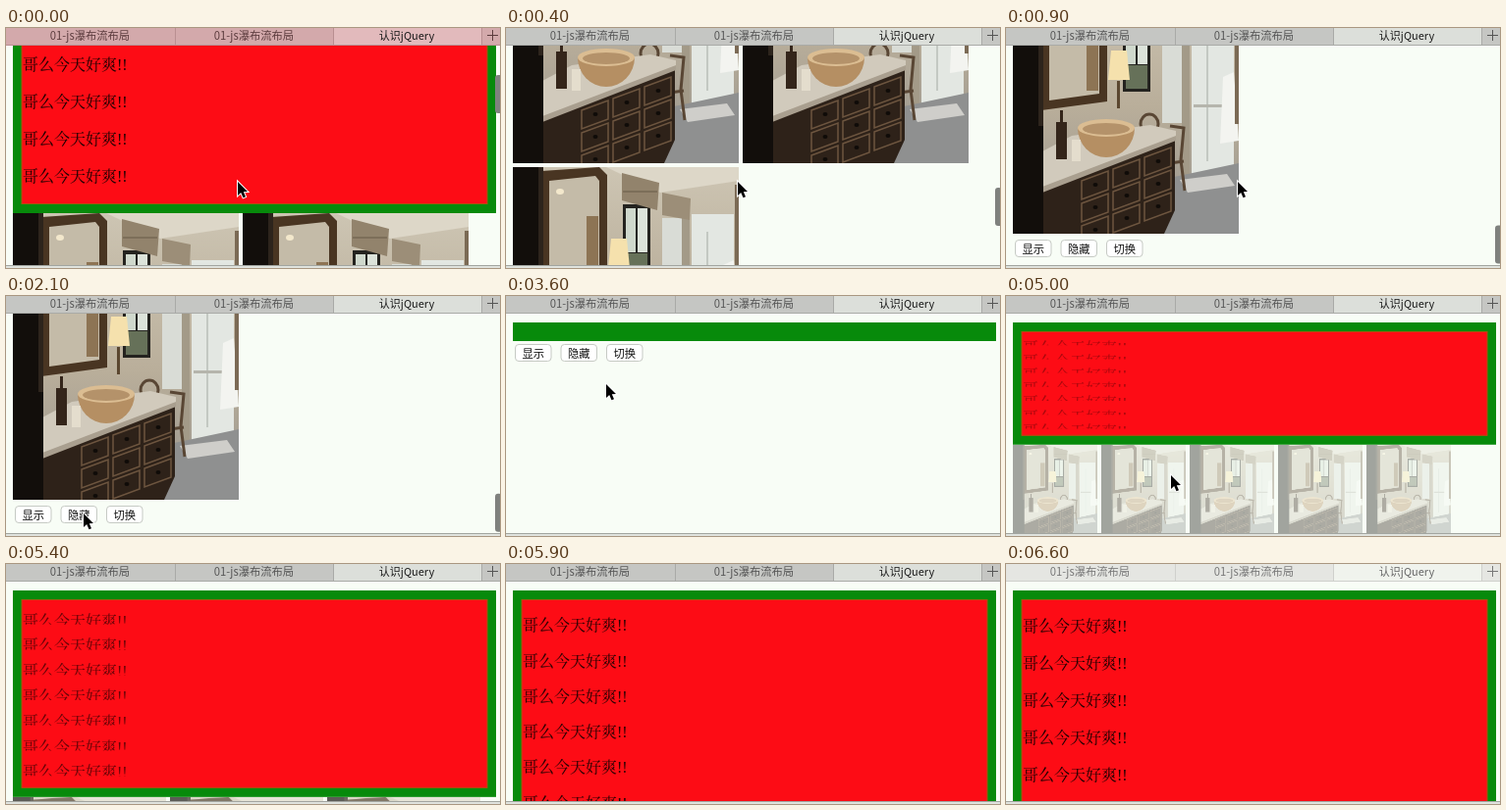
Recreate the animation shown at these times as an HTML page with a canvas. Size 503 by 245 pixels, loop 6700 ms.

```html
<!DOCTYPE html>
<html lang="zh-CN">
<head>
<meta charset="utf-8">
<style>
html, body { margin: 0; width: 100%; height: 100%; overflow: hidden; background: #f8fdf6; }
canvas { display: block; }
</style>
</head>
<body>
<canvas id="stage" width="503" height="245"></canvas>
<script>
const W = 503, H = 245, LOOP = 6700, STEP = 100;
const TOP = 18, BOTTOM = 243;
const PAGE = '#f8fdf6';
const SANS = '"Noto Sans CJK SC", "Noto Sans CJK", sans-serif';
const SERIF = '"Liberation Serif", "Noto Serif CJK SC", "Noto Sans CJK SC", serif';
const IMG_W = 230, IMG_H = 260, GAP = 4, IMAGES = 5;
const LINE = 21, MARGIN = 17, LINES = 7;
const HIDE = { start: 2760, length: 430 };
const SHOW = { start: 4150, length: 2030 };
const ctx = document.getElementById('stage').getContext('2d');

const clamp = (v, lo, hi) => Math.min(hi, Math.max(lo, v));
const swing = u => 0.5 - Math.cos(Math.PI * clamp(u, 0, 1)) / 2;
const progress = (t, a) => swing((t - a.start) / a.length);

function rect(c, color, x, y, w, h) {
  c.fillStyle = color;
  c.fillRect(x, y, w, h);
}

function poly(c, color, ...pts) {
  c.fillStyle = color;
  c.beginPath();
  for (let i = 0; i < pts.length; i += 2) c.lineTo(pts[i], pts[i + 1]);
  c.fill();
}

function oval(c, color, x, y, rx, ry, from = 0, to = Math.PI * 2) {
  c.fillStyle = color;
  c.beginPath();
  c.ellipse(x, y, rx, ry, 0, from, to);
  c.fill();
}

function label(text, x, y, font, color, align = 'center') {
  ctx.font = font;
  ctx.fillStyle = color;
  ctx.textAlign = align;
  ctx.textBaseline = 'middle';
  ctx.fillText(text, x, y);
}

// Bathroom picture, painted once
function paintRoom() {
  const cv = document.createElement('canvas');
  cv.width = IMG_W;
  cv.height = IMG_H;
  const c = cv.getContext('2d');
  const wall = c.createLinearGradient(0, 0, 0, IMG_H);
  wall.addColorStop(0, '#cdc5b3');
  wall.addColorStop(0.5, '#b9ae9a');
  wall.addColorStop(1, '#97948e');
  rect(c, wall, 0, 0, IMG_W, IMG_H);
  poly(c, '#ddd7c8', 95, 0, 230, 0, 230, 14, 150, 26);
  // shower and doorway
  rect(c, '#d9dcd6', 152, 52, 26, 95);
  rect(c, '#a39a88', 172, 40, 8, 165);
  rect(c, '#e3e7e2', 182, 48, 43, 155);
  rect(c, '#c3c8c2', 197, 66, 2, 120);
  rect(c, '#b5b5ac', 184, 128, 30, 3);
  poly(c, '#f3f4f0', 214, 100, 225, 95, 230, 165, 211, 168);
  rect(c, '#7b6a55', 226, 18, 4, 130);
  // windows and blinds
  rect(c, '#24231f', 112, 38, 28, 77);
  rect(c, '#cfd8cc', 115, 42, 10, 45);
  rect(c, '#dce3da', 127, 42, 10, 45);
  rect(c, '#667159', 115, 88, 22, 24);
  poly(c, '#92836c', 111, 6, 149, 16, 147, 44, 111, 34);
  poly(c, '#9c8e78', 152, 26, 181, 32, 180, 54, 152, 49);
  rect(c, '#7c6e59', 112, 24, 35, 2);
  // floor, rug and stool
  poly(c, '#8f9090', 150, 205, 230, 188, 230, 260, 140, 260);
  poly(c, '#cfceca', 170, 205, 218, 199, 226, 211, 178, 218);
  c.strokeStyle = '#594634';
  c.lineWidth = 3;
  c.beginPath();
  c.ellipse(139, 148, 9, 10, 0, 0, 7);
  c.moveTo(160, 150); c.lineTo(174, 152); c.lineTo(171, 185); c.lineTo(175, 216);
  c.moveTo(160, 188); c.lineTo(174, 186);
  c.stroke();
  // mirror
  poly(c, '#493522', 29, 4, 88, 0, 96, 8, 96, 125, 29, 134);
  poly(c, '#c4bba8', 37, 14, 84, 9, 88, 14, 88, 117, 37, 124);
  rect(c, '#8d7454', 75, 50, 12, 64);
  oval(c, '#f3e8cc', 48, 25, 4, 3);
  // lamp
  rect(c, '#5b4730', 106, 104, 3, 28);
  poly(c, '#f5e1ad', 100, 73, 116, 73, 119, 103, 97, 103);
  // vanity
  poly(c, '#2e2219', 30, 216, 165, 164, 165, 236, 154, 260, 30, 260);
  c.strokeStyle = '#6d553f';
  c.lineWidth = 1.5;
  for (let col = 0; col < 3; col++) {
    for (let row = 0; row < 3; row++) {
      const x = 70 + col * 32, y = 206 - col * 12 + row * 23;
      c.beginPath();
      c.moveTo(x, y); c.lineTo(x + 27, y - 10);
      c.lineTo(x + 27, y + 9); c.lineTo(x, y + 19);
      c.closePath();
      c.stroke();
      oval(c, '#0f0b08', x + 14, y + 4, 2.5, 2);
    }
  }
  poly(c, '#d1cabc', 30, 176, 60, 160, 140, 149, 166, 155, 166, 164, 30, 217);
  poly(c, '#a99f8f', 30, 212, 166, 160, 166, 165, 30, 218);
  // basin and bottles
  oval(c, '#b58f63', 95, 152, 29, 30, 0, Math.PI);
  oval(c, '#dbbd92', 95, 152, 29, 9);
  oval(c, '#b4926a', 95, 153, 24, 6);
  rect(c, '#34251a', 44, 146, 11, 38);
  rect(c, '#34251a', 48, 134, 3, 14);
  rect(c, '#e4ddcd', 60, 164, 9, 22);
  // dark door
  rect(c, '#120e0b', 0, 0, 31, IMG_H);
  rect(c, '#2d241c', 26, 0, 5, 150);
  return cv;
}
const room = paintRoom();

// Visible share of paragraphs and pictures
function shareAt(t) {
  if (t < SHOW.start) return 1 - progress(t, HIDE);
  return progress(t, SHOW);
}

function layout(p) {
  const inner = p * (LINES * (LINE + MARGIN) + MARGIN);
  const boxEnd = 27 + inner + 19;
  const w = IMG_W * p, h = IMG_H * p;
  const perRow = clamp(Math.floor(496 / (w + GAP)), 1, IMAGES);
  const rows = Math.ceil(IMAGES / perRow);
  const rowH = Math.max(h, 14) + GAP;
  const end = p > 0 ? boxEnd + rows * rowH - GAP : boxEnd;
  return { inner, boxEnd, w, h, perRow, rowH, end, buttons: p > 0 ? end + 6 : boxEnd + 3 };
}

function scrollAt(t, lay) {
  if (t >= SHOW.start) return 0;
  const limit = Math.max(0, lay.end + 35 - BOTTOM);
  const wanted = 140 + 769 * (1 - Math.pow(1 - clamp(t / 1000, 0, 1), 2.7));
  return Math.min(wanted, limit);
}

// time, x, y
const PATH = [
  [1300, 236, 157], [2050, 79, 222], [3320, 79, 222], [3600, 102, 90],
  [3950, 120, 57], [4300, 120, 57], [4700, 140, 118], [5000, 168, 183], [5350, 200, 262]
];

function cursorAt(t) {
  const i = PATH.findIndex(k => k[0] > t);
  if (i === 0) return PATH[0].slice(1);
  if (i < 0) return PATH[PATH.length - 1].slice(1);
  const [t0, x0, y0] = PATH[i - 1], [t1, x1, y1] = PATH[i];
  const u = (t - t0) / (t1 - t0);
  return [x0 + (x1 - x0) * u, y0 + (y1 - y0) * u];
}

function drawBox(lay, p) {
  rect(ctx, '#078a0b', 7, 27, 492, lay.boxEnd - 27);
  if (lay.inner < 1) return;
  rect(ctx, '#fd0c15', 16, 36, 474, lay.inner + 1);
  ctx.strokeStyle = '#a5560f';
  ctx.lineWidth = 1;
  ctx.strokeRect(16, 36.5, 474, lay.inner);
  for (let i = 0; i < LINES; i++) {
    const y = 36 + p * (MARGIN + i * (LINE + MARGIN));
    ctx.save();
    ctx.globalAlpha = p;
    if (p < 1) {
      ctx.beginPath();
      ctx.rect(16, y, 474 * p, LINE * p);
      ctx.clip();
    }
    label('哥么今天好爽!!', 17, y + 12, '16px ' + SERIF, '#1c0202', 'left');
    ctx.restore();
  }
}

function drawImages(lay, p) {
  if (p <= 0) return;
  ctx.globalAlpha = p;
  for (let i = 0; i < IMAGES; i++) {
    const x = 7 + (i % lay.perRow) * (lay.w + GAP);
    const y = lay.boxEnd + Math.floor(i / lay.perRow) * lay.rowH + lay.rowH - GAP - lay.h;
    ctx.drawImage(room, x, y, lay.w, lay.h);
  }
  ctx.globalAlpha = 1;
}

function drawButtons(y) {
  ['显示', '隐藏', '切换'].forEach((text, i) => {
    const x = 9.5 + i * 46.5;
    ctx.beginPath();
    ctx.roundRect(x, y + 0.5, 36.5, 17, 3.5);
    ctx.fillStyle = '#fff';
    ctx.fill();
    ctx.strokeStyle = '#c6cac4';
    ctx.lineWidth = 1;
    ctx.stroke();
    label(text, x + 18.2, y + 9.3, '11.3px ' + SANS, '#111');
  });
}

function drawTabs(red, idle) {
  const [back, front, edge] = idle ? ['#e5e6e2', '#f0f3ed', '#cfd0cc']
    : red ? ['#d3a9ab', '#e2babc', '#b98f91'] : ['#c5c6c3', '#dcdfda', '#a9aaa7'];
  rect(ctx, back, 0, 0, W, TOP);
  rect(ctx, front, 333, 0, 151, TOP);
  rect(ctx, edge, 0, TOP - 1, W, 1);
  for (const x of [172, 333, 484]) rect(ctx, edge, x, 0, 1, TOP);
  const dim = idle ? '#777' : red ? '#5c3c3e' : '#555';
  label('01-js瀑布流布局', 85.5, 7.5, '11.3px ' + SANS, dim);
  label('01-js瀑布流布局', 252.5, 7.5, '11.3px ' + SANS, dim);
  label('认识jQuery', 408, 7.5, (idle ? '' : '500 ') + '11px ' + SANS, idle ? '#666' : '#1a1a1a');
  rect(ctx, dim, 490, 7, 11, 1);
  rect(ctx, dim, 495, 2, 1, 11);
}

function drawThumb(t, scroll) {
  const alpha = 1 - clamp((t - 2150) / 300, 0, 1);
  if (!alpha) return;
  ctx.globalAlpha = alpha;
  ctx.beginPath();
  ctx.roundRect(498, 20 + scroll * 0.2, 7, 39, 3);
  ctx.fillStyle = '#7f817e';
  ctx.fill();
  ctx.globalAlpha = 1;
}

function drawCursor(x, y) {
  ctx.save();
  ctx.translate(x, y);
  ctx.beginPath();
  for (const [px, py] of [[0, 0], [0, 14], [3.2, 11], [5.5, 16.3], [8, 15.2], [5.8, 10.2], [10, 10]])
    ctx.lineTo(px, py);
  ctx.closePath();
  ctx.strokeStyle = '#fff';
  ctx.lineWidth = 2;
  ctx.stroke();
  ctx.fillStyle = '#000';
  ctx.fill();
  ctx.restore();
}

function draw(t) {
  const p = shareAt(t), lay = layout(p), scroll = scrollAt(t, lay);
  rect(ctx, PAGE, 0, 0, W, H);
  ctx.save();
  ctx.translate(0, -Math.round(scroll));
  drawBox(lay, p);
  drawImages(lay, p);
  drawButtons(Math.round(lay.buttons));
  ctx.restore();
  drawThumb(t, scroll);
  rect(ctx, '#dfe2dd', 0, BOTTOM, W, 2);
  rect(ctx, '#a2a5a0', 0, BOTTOM - 1, W, 1);
  drawTabs(scroll > 20 && lay.boxEnd - scroll > TOP, t >= 6500);
  drawCursor(...cursorAt(t));
}

function tick(now) {
  draw(Math.floor((now % LOOP) / STEP) * STEP);
  requestAnimationFrame(tick);
}
draw(0);
requestAnimationFrame(tick);
</script>
</body>
</html>
```
